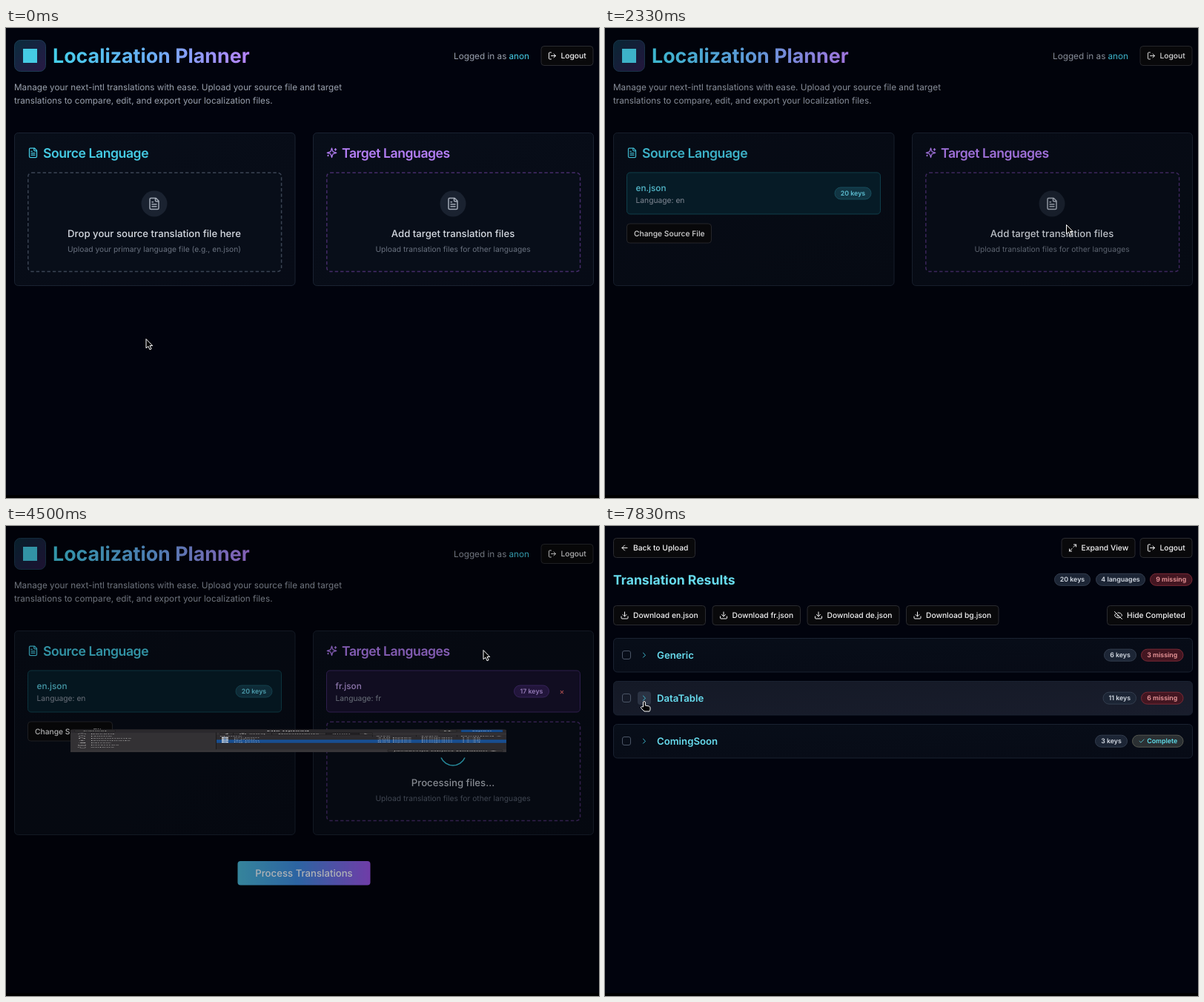
An HTML page that plays this animation: 800x634 px, repeating every 8 s.

```html
<!DOCTYPE html>
<html lang="en">
<head>
<meta charset="utf-8">
<title>Localization Planner</title>
<style>
  html, body { margin: 0; width: 100%; height: 100%; overflow: hidden; background: #01030d; }
  svg { display: block; width: 100%; height: 100%; }
  text { font-family: Inter, sans-serif; white-space: pre; text-rendering: geometricPrecision; }
  .gtk text { font-family: "Noto Sans", sans-serif; }
</style>
</head>
<body>
<svg viewBox="0 0 800 634" preserveAspectRatio="none">
  <defs>
    <linearGradient id="title" gradientUnits="userSpaceOnUse" x1="63" x2="328" y1="0" y2="0">
      <stop stop-color="#44cfe9"/><stop offset=".5" stop-color="#6aaef5"/><stop offset="1" stop-color="#b784fb"/>
    </linearGradient>
    <linearGradient id="tile" x2="1" y2="1">
      <stop stop-color="#0a2c3c"/><stop offset="1" stop-color="#281845"/>
    </linearGradient>
    <linearGradient id="action">
      <stop stop-color="#4ab7d7"/><stop offset=".45" stop-color="#3d8ae0"/><stop offset="1" stop-color="#9a54e8"/>
    </linearGradient>
    <linearGradient id="panel" x2="1" y2="1">
      <stop stop-color="#080e19"/><stop offset="1" stop-color="#070b16"/>
    </linearGradient>
    <linearGradient id="hover" x2="1" y2="1">
      <stop stop-color="#141926"/><stop offset="1" stop-color="#191d2c"/>
    </linearGradient>
  </defs>
  <g id="view"></g>
</svg>
<script>
const LOOP = 8000, STEPS = 48;
const TINY = 8.82, SMALL = 10.28, BODY = 11.75, LEAD = 13.2, HEAD = 17.6;

const ICON = {
  file: 'M15 2H6a2 2 0 0 0-2 2v16a2 2 0 0 0 2 2h12a2 2 0 0 0 2-2V7ZM14 2v4a2 2 0 0 0 2 2h4M10 9H8M16 13H8M16 17H8',
  sparkles: 'M10 15.5A2 2 0 0 0 8.5 14L2 12l6.5-2A2 2 0 0 0 10 8.5L12 2l2 6.5A2 2 0 0 0 15.5 10l6.5 2-6.5 2A2 2 0 0 0 14 15.5L12 22ZM20 3v4M22 5h-4M4 17v2M5 18H3',
  logout: 'M9 21H5a2 2 0 0 1-2-2V5a2 2 0 0 1 2-2h4M16 17l5-5-5-5M21 12H9',
  download: 'M21 15v4a2 2 0 0 1-2 2H5a2 2 0 0 1-2-2v-4M7 10l5 5 5-5M12 15V3',
  back: 'M12 19l-7-7 7-7M19 12H5',
  expand: 'M15 3h6v6M9 21H3v-6M21 3l-7 7M3 21l7-7',
  hide: 'M10.7 5A10.7 10.7 0 0 1 22 12a11 11 0 0 1-1.5 2.5M14 14.2a3 3 0 0 1-4.2-4.2M17.5 17.5A10.7 10.7 0 0 1 2 12a11 11 0 0 1 4.5-5.5M2 2l20 20',
  chevron: 'M9 18l6-6-6-6',
  check: 'M20 6L9 17l-5-5',
  clock: 'M12 2a10 10 0 1 0 .1 0M7 8l5 4 4-4',
  home: 'M2 12L12 3l10 9M5 10v11h5v-6h4v6h5V10',
  page: 'M5 2h9l5 5v15H5ZM14 2v5h5',
  save: 'M12 2v14M6 10l6 6 6-6M3 21h18',
  music: 'M9 18V4h11v13M9 8h11M5 15h4v5H4v-4ZM16 14h4v5h-5v-4Z',
  picture: 'M3 4h18v16H3ZM6 17l4-5 3 3 2-2 3 4Z',
  video: 'M7 6h14v12H7ZM7 12L2 7v10Z',
  search: 'M10 3a7 7 0 1 0 .1 0M15 15l6 6'
};

const text = (x, cy, str, size, fill, weight = 400, anchor = 'start', extra = '') =>
  `<text x="${x}" y="${cy + size * 0.36}" font-size="${size}" fill="${fill}" font-weight="${weight}" text-anchor="${anchor}" ${extra}>${str}</text>`;
const rect = (x, y, w, h, fill, stroke = 'none', r = 0, extra = '') =>
  `<rect x="${x}" y="${y}" width="${w}" height="${h}" rx="${r}" fill="${fill}" stroke="${stroke}" ${extra}/>`;
const path = (d, fill, extra = '') => `<path d="${d}" fill="${fill}" ${extra}/>`;
const icon = (name, cx, cy, size, color, width = 2) =>
  `<g transform="translate(${cx - size / 2} ${cy - size / 2}) scale(${size / 24})">${path(ICON[name], 'none',
    `stroke="${color}" stroke-width="${width}" stroke-linecap="round" stroke-linejoin="round"`)}</g>`;

function button(x, cy, w, label, iconName) {
  return rect(x + .5, cy - 13, w - 1, 26, '#09090b', '#2a2b30', 4) +
    (iconName ? icon(iconName, x + 15.5, cy, 12, '#f4f4f5') : '') +
    text(x + (iconName ? 27 : 10), cy, label, SMALL, '#f4f4f5', 500);
}

const TONE = {
  gray: ['#1c2535', '#333d4e', '#d3d9e2'],
  red: ['#431621', '#7b2935', '#ee9a9d'],
  done: ['#2b3033', '#565850', '#5fdfec'],
  cyan: ['#133c4c', '#1a5768', '#6ad9ef'],
  purple: ['#2f1d51', '#4b307b', '#caa7fa']
};
function badge(x, cy, w, label, tone) {
  const [fill, stroke, color] = TONE[tone], done = tone === 'done';
  return rect(x + .5, cy - 8, w - 1, 16, fill, stroke, 8) +
    (done ? icon('check', x + 13, cy, 9, color) : '') +
    text(x + w / 2 + (done ? 6 : 0), cy, label, TINY, color, 600, 'middle');
}

const panel = (y, h, x = 11.5, w = 781, fill = 'url(#panel)') => rect(x, y, w, h, fill, '#1a2231', 5);

function fileCard(x, y, lang, keys, purple) {
  const [fill, stroke, color] = purple ? ['#17122d', '#40296a', '#c3a3ee'] : ['#071f2b', '#114754', '#5fd3e8'];
  return rect(x + .5, y + .5, 342, 56, fill, stroke, 4.5) +
    text(x + 12.5, y + 21.5, lang + '.json', BODY, color, 500) +
    text(x + 12.5, y + 38, 'Language: ' + lang, SMALL, '#929aa8') +
    badge(x + (purple ? 253 : 280.5), y + 28.5, purple ? 48 : 50, keys + ' keys', purple ? 'purple' : 'cyan') +
    (purple ? text(x + 318, y + 29, '×', SMALL, '#e5686b', 500, 'middle') : '');
}

function dropZone(x, y, heading, hint, stroke, busy) {
  const cx = x + 171;
  return rect(x + .8, y + .8, 341.8, 133.2, '#080e19', stroke, 5, 'stroke-width="1.47" stroke-dasharray="4.4 3"') +
    (busy
      ? path(`M${cx - 16} ${y + 49}a17.5 17.5 0 0 0 32 0`, 'none', 'stroke="#35bfd6" stroke-width="1.5"')
      : `<circle cx="${cx}" cy="${y + 42.5}" r="17.5" fill="#1a2230"/>` + icon('file', cx, y + 42.5, 18, '#a1a9b5')) +
    text(cx, y + 82.5, busy ? 'Processing files...' : heading, LEAD, busy ? '#b9bfc9' : '#d5dae2', 500, 'middle') +
    text(cx, y + 103.5, hint, SMALL, busy ? '#586070' : '#69717f', 400, 'middle');
}

function uploadPage(step) {
  const files = step < 22 ? [] : step < 28 ? ['fr'] : ['fr', 'de', 'bg'];
  const grow = 69 * files.length, tight = 'letter-spacing="-.44"';
  const lines = ['Manage your next-intl translations with ease. Upload your source file and target',
    'translations to compare, edit, and export your localization files.'];
  return rect(11.5, 16.5, 42, 42, 'url(#tile)', '#1c3a52', 8) + rect(23, 28, 19, 19, '#45cbe4') +
    text(63, 37.8, 'Localization Planner', 26.8, 'url(#title)', 700) +
    text(604, 37.8, 'Logged in as', BODY, '#9aa1ad') + text(678.5, 37.8, 'anon', BODY, '#45cbe4') +
    button(721.5, 37.5, 71, 'Logout', 'logout') +
    lines.map((s, i) => text(11, 79.5 + 18 * i, s, BODY, '#9aa1ad')).join('') +
    panel(141.5, 206 + grow, 11.5, 378.5) + panel(141.5, 206 + grow, 414.5, 378) +
    icon('file', 36.5, 168.3, 15, '#45cbe4') + text(50, 168.6, 'Source Language', HEAD, '#45cbe4', 600, 'start', tight) +
    icon('sparkles', 439.5, 168.3, 15, '#b57ff7') + text(453, 168.6, 'Target Languages', HEAD, '#b57ff7', 600, 'start', tight) +
    (step < 13
      ? dropZone(29, 194.5, 'Drop your source translation file here', 'Upload your primary language file (e.g., en.json)', '#3b4454')
      : fileCard(29, 194.5, 'en', 20) + button(29, 277, 115, 'Change Source File')) +
    files.map((lang, i) => fileCard(432, 194.5 + 69 * i, lang, 17, true)).join('') +
    dropZone(432, 194.5 + grow, 'Add target translation files', 'Upload translation files for other languages', '#452b69', step === 27) +
    (files.length ? rect(312.5, 383 + grow, 179, 32.5, 'url(#action)', 'none', 4) +
      text(402, 399.5 + grow, 'Process Translations', LEAD, '#f2f6fc', 500, 'middle') : '');
}

function resultsPage(step) {
  const hovered = step < 41 ? -1 : step < 43 ? 2 : 1;
  const downloads = [['en', 11, 125], ['fr', 144.5, 119.5], ['de', 272.5, 125], ['bg', 406, 125.5]];
  const rows = [
    ['Generic', [673, 44, '6 keys', 'gray'], [723, 57.5, '3 missing', 'red']],
    ['DataTable', [671.5, 45.5, '11 keys', 'gray'], [723, 57.5, '6 missing', 'red']],
    ['ComingSoon', [661, 44, '3 keys', 'gray'], [711, 69.5, 'Complete', 'done']]
  ];
  const tag = (cy, [x, w, label, tone]) => badge(x, cy, w, label, tone);
  return button(11, 29.5, 111, 'Back to Upload', 'back') +
    button(615.5, 29.5, 100, 'Expand View', 'expand') + button(721.5, 29.5, 71, 'Logout', 'logout') +
    text(11, 72.5, 'Translation Results', HEAD, '#67dbed', 700) +
    [[606, 49, '20 keys', 'gray'], [662, 67, '4 languages', 'gray'], [735, 57.5, '9 missing', 'red']].map(b => tag(72.3, b)).join('') +
    downloads.map(([lang, x, w]) => button(x, 120.5, w, `Download ${lang}.json`, 'download')).join('') +
    button(677, 120.5, 115.5, 'Hide Completed', 'hide') +
    rows.map(([name, ...tags], i) => {
      const cy = 174.2 + 58 * i, over = hovered === i;
      return panel(cy - 22.7, 45.5, 11.5, 781, over ? 'url(#hover)' : 'url(#panel)') +
        rect(23.5, cy - 5.7, 11, 11, 'none', '#4b5566', 2.5) +
        (over && step > 43 ? rect(44, cy - 9, 18, 18, '#2b3343', 'none', 4) : '') +
        icon('chevron', 53, cy, 12, '#3fc0d6') + text(70, cy, name, LEAD, '#67dbed', 600) +
        tags.map(b => tag(cy, b)).join('');
    }).join('');
}

// File chooser: first and last step on screen.
const DIALOGS = [[6, 13], [15, 21], [23, 27]];

function selection(which, step) {
  if (which === 0) return step < 10 ? [] : [0];
  if (which === 1) return step < 18 ? [0] : [1];
  return step < 25 ? [] : step < 26 ? [2] : [2, 3];
}

function dialog(which, step) {
  const ink = '#eeeeec', dim = '#aaa9a8', edge = '#1b1a1c', raised = '#353335', size = 10.3;
  const t = (x, y, s, color = ink, weight = 400, anchor = 'start') => text(x, y, s, size, color, weight, anchor);
  const chosen = selection(which, step);
  const places = [['Recent', 'clock'], ['Home', 'home'], ['Documents', 'page'], ['Downloads', 'save'],
    ['Music', 'music'], ['Pictures', 'picture'], ['Videos', 'video']];
  const files = [['en', 710, 46], ['fr', 706, 38], ['de', 698, 36], ['bg', 893, 34]];
  const line = (x, y, w, h) => rect(x, y, w, h, edge);
  const [first, last] = DIALOGS[which];
  const scale = step === first ? .5 : step === last ? .111 : 1;
  return `<g class="gtk" transform="translate(0 290) scale(1 ${scale}) translate(0 -290)">` +
    path('M87 425.5V157a6 6 0 0 1 6-6h576a6 6 0 0 1 6 6v268.5Z', '#2d2b2e') +
    rect(87, 186, 196, 205, '#333134') + rect(283, 186, 392, 33, '#333134') + rect(87, 391, 588, 34.5, '#373538') +
    path('M87 185V157a6 6 0 0 1 6-6h576a6 6 0 0 1 6 6v28Z', '#2b292c') +
    line(87, 185, 588, 1) + line(283, 186, 1, 205) + line(87, 391, 588, 1) +
    rect(92.5, 156.5, 55, 23.5, raised, edge, 3) + t(120, 168, 'Cancel', ink, 400, 'middle') +
    t(380.5, 168, 'File Upload', '#fff', 700, 'middle') +
    rect(584, 156.5, 24, 23.5, raised, edge, 3) + icon('search', 596, 168, 12, ink, 3) +
    rect(614, 156.5, 56, 23.5, which === 0 && step < 12 ? '#14427f' : '#15539e', '#0f3b71', 3) +
    t(642, 168, 'Open', '#fff', 400, 'middle') +
    places.map(([name, glyph], i) => icon(glyph, 102.5, 201.7 + 27.9 * i, 12, '#d6d5d4', 2.4) +
      t(114, 201.7 + 27.9 * i, name)).join('') +
    (which === 0 && step > 8 ? rect(280, 188, 2, 153, '#98979a', 'none', 1) : '') +
    rect(288.5, 190.5, 206, 24, raised, edge, 3) + rect(431, 191, 45, 23, '#211f22') +
    [306, 358, 431, 476].map(x => line(x, 191, 1, 23)).join('') +
    path('M299.5 198.5v8l-4.5-4Z', ink) + path('M483.5 198.5v8l4.5-4Z', dim) +
    icon('home', 319.5, 202, 12, ink, 2.6) + t(328, 202.5, 'vurq') + t(367, 202.5, 'Documents') + t(440, 202.5, 'anon') +
    rect(284, 219, 391, 19, '#2f2d30') + line(284, 219, 391, 1) +
    [494, 553, 608].map(x => line(x, 220, 1, 18)).join('') +
    [[288, 'Name'], [499, 'Size'], [559, 'Type'], [613, 'Modified']].map(([x, s]) => t(x, 229, s, dim, 700)).join('') +
    path('M661 231h8l-4-4.5Z', dim) +
    files.map(([lang, bytes, minute], i) => {
      const y = 248 + 18.4 * i;
      return (chosen.includes(i) ? rect(284, y - 9.5, 391, 18.5, '#15539e') : '') +
        (which === 1 && step < 18 && i === 0 ? rect(284.5, y - 9, 390, 17.5, 'none', '#8eb0d8', 0, 'stroke-dasharray="1 1"') : '') +
        path(`M291 ${y - 6}h6l3 3v9h-9Z`, '#eceff2') + path(`M295.5 ${y - 2.5}l2.5 2.5-2.5 2.5-2.5-2.5Z`, '#2866b0') +
        t(307, y, lang + '.json') + t(501, y, bytes + ' bytes') + t(560, y, 'Program') + t(614, y, '17:' + minute);
    }).join('') +
    rect(515, 396.5, 155, 24, raised, edge, 3) + t(523, 408.6, 'JavaScript Object Notation') +
    path('M653 406.5h9l-4.5 5Z', ink) + '</g>';
}

// Pointer path: step, x, y of the tip.
const POINTER = [
  [0, 188.5, 419], [1, 190, 405], [3, 197, 310], [5, 201, 285], [7, 201, 285], [10, 319, 250], [11, 320, 249],
  [12, 636, 170], [13, 640, 169], [14, 622, 265], [15, 612, 307], [16, 612, 307], [18, 330, 267], [19, 332, 267],
  [20, 640, 169], [21, 642, 169], [22, 612, 330], [23, 608, 340], [25, 325, 286], [26, 330, 303], [27, 643.5, 167],
  [28, 640, 210], [29, 560, 390], [31, 396, 580], [33, 391, 595], [38, 391, 595], [40, 250, 445],
  [42, 72, 285], [44, 54, 244], [45, 53, 237], [47, 53, 237]
];

function pointer(step) {
  const i = Math.max(1, POINTER.findIndex(p => p[0] >= step));
  const [a, x0, y0] = POINTER[i - 1], [b, x1, y1] = POINTER[i];
  const k = (step - a) / (b - a), x = x0 + (x1 - x0) * k, y = y0 + (y1 - y0) * k;
  const hand = step > 43 || (step > 31 && step < 36);
  const shape = hand
    ? 'M-1.5 7V1a1.4 1.4 0 0 1 2.8 0V5l5 1q1.7.5 1.7 2.2V10q0 1.5-1 3H0L-4.5 8.5q-.5-1.7 1.2-1.7Z'
    : 'M.5.5V12.8l2.9-2.5 2.1 4.5 2.1-1-2.1-4.3H9.2Z';
  return `<g transform="translate(${x} ${y})">` +
    path(shape, '#050505', 'stroke="#fff" stroke-width="1" stroke-linejoin="round"') + '</g>';
}

function shade(step) {
  for (const [first, last] of DIALOGS) {
    if (step === first) return .13;
    if (step === first + 1) return .22;
    if (step > first && step <= last) return .28;
    if (step === last + 1) return .12;
  }
  return 0;
}

const view = document.getElementById('view');
const start = performance.now();
let shown = -1;

function draw() {
  // The small offset absorbs delays rounded to 10 ms.
  const step = Math.floor(((performance.now() - start) % LOOP) * STEPS / LOOP + .05) % STEPS;
  if (step !== shown) {
    shown = step;
    const open = DIALOGS.findIndex(([first, last]) => step >= first && step <= last);
    view.innerHTML = rect(0, 0, 800, 634, '#01030d') +
      (step < 36 ? uploadPage(step) : resultsPage(step)) + rect(0, 630, 800, 4, '#000') +
      rect(0, 0, 800, 634, '#000', 'none', 0, `opacity="${shade(step)}"`) +
      (open < 0 ? '' : dialog(open, step)) + pointer(step);
  }
  requestAnimationFrame(draw);
}
draw();
</script>
</body>
</html>
```
